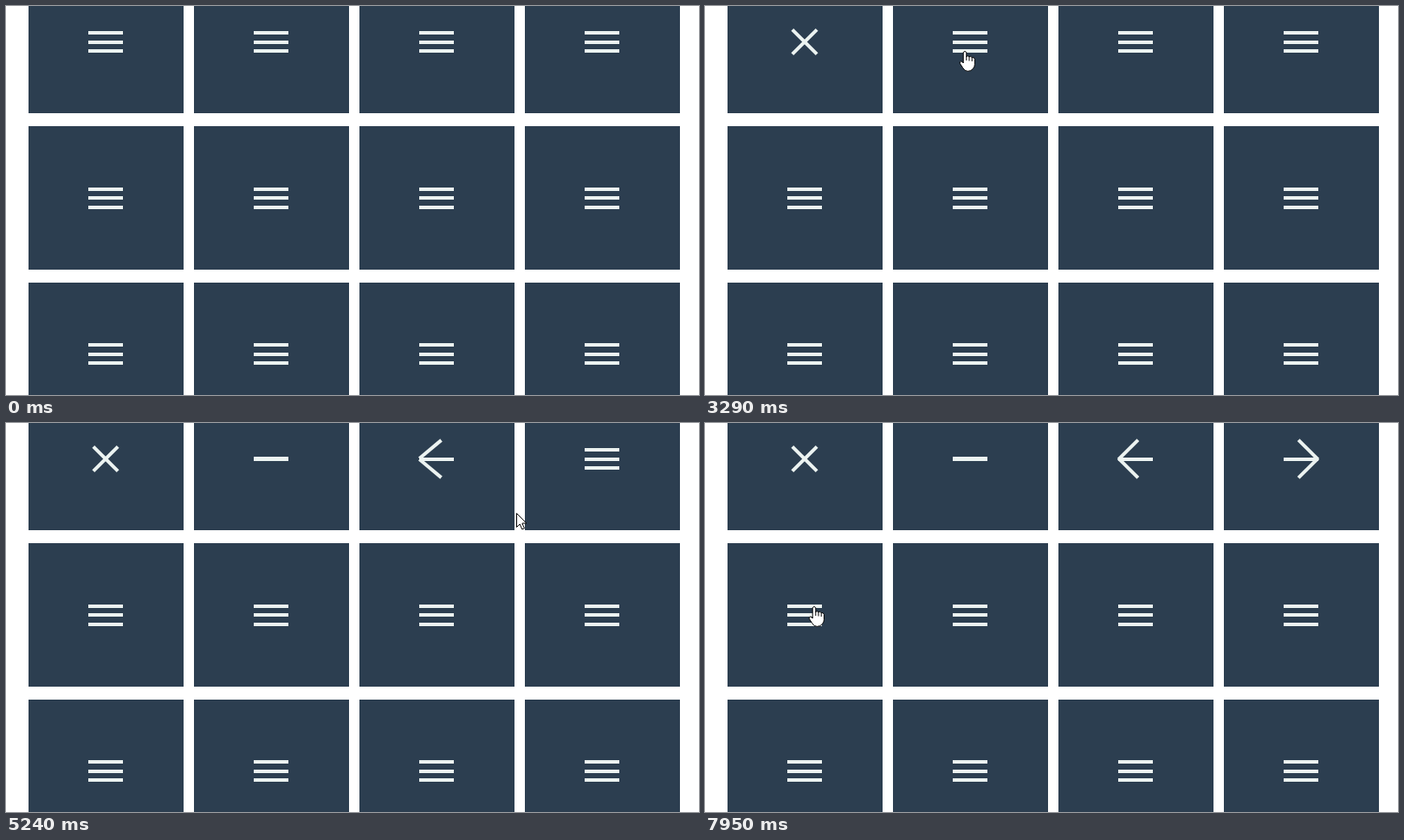
An HTML page for the animation above (8000 ms loop, 800x450 px).

```html
<!DOCTYPE html>
<html lang="en">
<head>
<meta charset="utf-8">
<title>Menu icons</title>
<style>
  html, body { margin: 0; width: 100%; height: 100%; overflow: hidden; background: #fff; }
  svg { display: block; }
  .tile { fill: #2c3e50; }
  .bar { fill: #ecf3f1; }
  .cursor { fill: #fff; stroke: #000; stroke-width: 1; stroke-linejoin: round; }
</style>
</head>
<body>
<svg width="800" height="450" viewBox="0 0 800 450">
  <g id="grid"></g>
  <path id="arrow" class="cursor" d="M.5 .5V16.5L4.2 13L6.8 19L9.4 17.9L6.9 12H11.8Z"/>
  <g id="hand" class="cursor">
    <path d="M-1.8 1.6Q0 -.8 1.8 1.6V6.4Q3.4 4.9 5 6.8Q6.8 5.6 8.2 7.6Q10.4 6.8 11.4 9.4V15.5Q11.4 18.5 9.4 20.5Q7.2 23.4 3.4 23.4Q-.2 23.4 -2.2 19.8L-5.6 14.6Q-6.4 12.4 -4.4 12Q-3 12 -1.8 14Z"/>
    <path fill="none" d="M1.8 6V11M5 7V11.5M8.2 7.6V12"/>
  </g>
</svg>
<script>
const LOOP = 8000, STEP = 89.6;
const NS = "http://www.w3.org/2000/svg";
const COL = 191, LEFT = 95, LEN = 40, THICK = 4;
const TOP = 29, LOW = 50, MIDDLE = 39.5;

// Key points of the pointer: ms, x, y
const PATH = [
  [1300, 25, 65], [1666, 103, 45], [1970, 114, 30], [2200, 118, 42],
  [2560, 200, 85], [2920, 291, 57], [3280, 300, 52], [3370, 301, 52],
  [3640, 350, 88], [4000, 411, 88], [4444, 485, 66], [4930, 489, 42],
  [5251, 589, 104], [5690, 667, 81], [6140, 681, 56], [6700, 682, 50],
  [7000, 612, 125], [7220, 493, 163], [7400, 320, 146], [7760, 85, 203],
  [7937, 126, 212]
];

const grid = document.getElementById("grid");
const arrow = document.getElementById("arrow");
const hand = document.getElementById("hand");

function set(el, attrs) {
  for (const k in attrs) el.setAttribute(k, attrs[k]);
}

function rect(cls, x, y, width, height) {
  const r = document.createElementNS(NS, "rect");
  set(r, { class: cls, x, y, width, height });
  return grid.appendChild(r);
}

const barTop = (row, i) => Math.round(29.2 + 180.45 * row + 10.45 * i);

const icons = [];
for (let row = 0; row < 3; row++) {
  for (let col = 0; col < 4; col++) {
    rect("tile", 26 + col * COL, row * 181 - 42, 179, 166);
    icons.push([0, 1, 2].map(i => rect("bar", LEFT + col * COL, barTop(row, i), LEN, THICK)));
  }
}

const clamp = v => Math.min(1, Math.max(0, v));
const mix = (a, b, p) => a + (b - a) * p;

// Same curve as the CSS keyword "ease"
function ease(p) {
  let lo = 0, hi = 1;
  for (let i = 0; i < 24; i++) {
    const s = (lo + hi) / 2, r = 1 - s;
    if (.75 * r * r * s + .75 * r * s * s + s * s * s < p) lo = s; else hi = s;
  }
  const r = 1 - lo;
  return .3 * r * r * lo + 3 * r * lo * lo + lo * lo * lo;
}
const tween = (t, start, len) => ease(clamp((t - start) / len));

function place(bar, x, y, width, turn, pivot) {
  set(bar, { x, y, width, transform: `rotate(${turn} ${pivot} ${y + THICK / 2})` });
}

function cross([top, mid, low], t) {
  const close = tween(t, 2090, 300), turn = 45 * tween(t, 2590, 300);
  const pivot = LEFT + LEN / 2;
  mid.setAttribute("opacity", 1 - close);
  place(top, LEFT, mix(TOP, MIDDLE, close), LEN, turn, pivot);
  place(low, LEFT, mix(LOW, MIDDLE, close), LEN, -turn, pivot);
}

function minus([top, , low], t) {
  const p = tween(t, 3330, 500);
  top.setAttribute("y", mix(TOP, 39, p));
  low.setAttribute("y", mix(LOW, 40, p));
}

function chevron([top, , low], t, start, col, right) {
  const p = tween(t, start, 500), x = LEFT + col * COL;
  const w = mix(LEN, 32, p), turn = 45 * p * (right ? 1 : -1);
  const left = right ? x + LEN - w : x;
  const pivot = right ? x + LEN - 1 : x + 1;
  place(top, left, mix(TOP, MIDDLE, p), w, turn, pivot);
  place(low, left, mix(LOW, MIDDLE, p), w, -turn, pivot);
}

function overIcon(x, y) {
  const dx = (x - LEFT) % COL;
  return dx >= 0 && dx <= LEN &&
    [0, 1, 2].some(row => y >= barTop(row, 0) && y < barTop(row, 2) + THICK);
}

function pointer(t) {
  const shown = t >= PATH[0][0];
  let i = 0;
  while (i < PATH.length - 2 && t >= PATH[i + 1][0]) i++;
  const [a, b] = [PATH[i], PATH[i + 1]];
  const p = clamp((t - a[0]) / (b[0] - a[0]));
  const x = Math.round(mix(a[1], b[1], p)), y = Math.round(mix(a[2], b[2], p));
  const over = overIcon(x, y);
  arrow.style.display = shown && !over ? "" : "none";
  hand.style.display = shown && over ? "" : "none";
  set(over ? hand : arrow, { transform: `translate(${x} ${y})` });
}

// Time moves in even steps, like a screen recording
const snap = t => (Math.floor(t / STEP - .42) + .6) * STEP;

function draw(now) {
  const t = snap(now % LOOP);
  cross(icons[0], t);
  minus(icons[1], t);
  chevron(icons[2], t, 4950, 2, false);
  chevron(icons[3], t, 6710, 3, true);
  pointer(t);
}

const begin = performance.now();
function loop() {
  draw(performance.now() - begin);
  requestAnimationFrame(loop);
}
loop();
</script>
</body>
</html>
```
